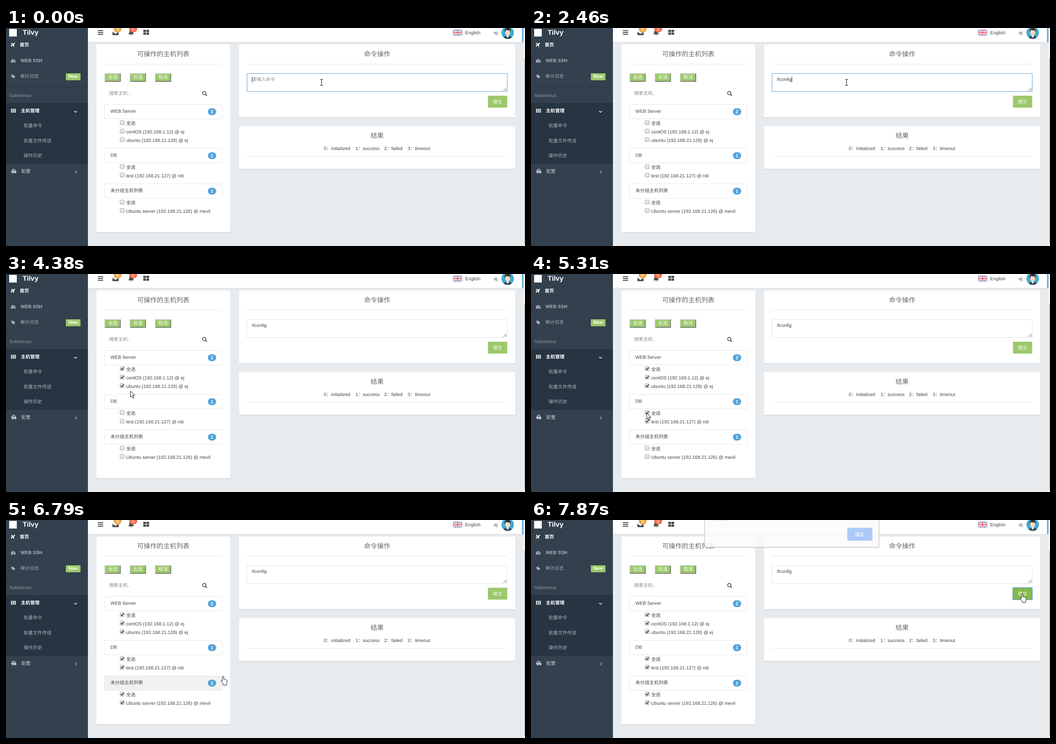
Animation of 1153 by 486 pixels, one loop 8 s. Source, as an HTML page:

```html
<!DOCTYPE html>
<html lang="zh-CN">
<head>
<meta charset="utf-8">
<title>批量命令</title>
<style>
  html, body { margin: 0; width: 100%; height: 100%; overflow: hidden; background: #e7ebee; }
  svg.stage { display: block; width: 100%; height: 100%; }
  text {
    font: 10.35px "Liberation Sans", "Noto Sans CJK SC", sans-serif;
    text-rendering: geometricPrecision;
    fill: #444;
    white-space: pre;
  }
  .title { font-size: 14.5px; font-weight: 300; text-anchor: middle; fill: #666; }
  .mid { text-anchor: middle; }
  .bold { font-weight: 700; }
  .white { fill: #fff; }
  .soft { fill: #a9b4bd; }
  .hint { fill: #8c8c8c; }
  .panel { fill: #fff; }
  .edge { fill: #d3d8db; }
  .rule { fill: #e6e6e6; }
  .row { fill: #fff; stroke: #e7e7e7; }
  .row.over { fill: #f1f1f1; }
  .box { fill: url(#boxFill); stroke: #a3a3a3; }
  .tick { fill: none; stroke: #333; stroke-width: 1.9; }
  .line { fill: none; stroke-width: 1.3; }
  #field { fill: #fff; stroke: #e2e4e6; }
  #field.focus { stroke: #5b9fd2; }
  #send { fill: #9cc96b; }
  #send.over { fill: #86ba4a; }
  #send.focus { stroke: #5a9bd0; stroke-width: 1.5; }
  .cursor { stroke-linejoin: round; }
</style>
</head>
<body>
<svg class="stage" viewBox="0 0 1153 486" xmlns="http://www.w3.org/2000/svg">
  <defs>
    <linearGradient id="boxFill" x2="0" y2="1">
      <stop stop-color="#f0f0f0"/><stop offset="1" stop-color="#dcdcdc"/>
    </linearGradient>
    <clipPath id="face"><circle cx="1114.5" cy="10.5" r="13.8"/></clipPath>
  </defs>

  <rect width="1153" height="486" fill="#e7ebee"/>

  <!-- top bar -->
  <rect x="182" y="31" width="967" height="2" fill="#d6dbde"/>
  <rect x="182" width="967" height="31.5" fill="#fff"/>
  <path d="M204 6h12M204 10h12M204 14h12" stroke="#4d4d4d" stroke-width="2"/>
  <path d="M236.5 7l6.8 5 6.8-5v9h-13.6z" fill="#4d4d4d"/>
  <path d="M236.5 7.5l6.8 5 6.8-5" stroke="#fff" class="line"/>
  <rect x="239" y="-6" width="18" height="15.5" rx="7.7" fill="#ebaa4b"/>
  <text x="248" y="6" class="mid white">9</text>
  <path d="M271.5 14q2.5-2 2.5-6a4 4 0 0 1 8 0q0 4 2.5 6zM276.3 14.8h3.4q-1.7 3-3.4 0z" fill="#4d4d4d"/>
  <rect x="273.5" y="-6" width="18" height="15.5" rx="7.7" fill="#f76c51"/>
  <text x="282.5" y="6" class="mid white">5</text>
  <path d="M305 4h6v5h-6zM312 4h6v5h-6zM305 10h6v5h-6zM312 10h6v5h-6z" fill="#4d4d4d"/>
  <g>
    <rect x="993" y="3.5" width="20.5" height="13.5" fill="#6f93cb"/>
    <path d="M993 3.5l20.5 13.5M1013.5 3.5l-20.5 13.5" stroke="#f2f2f5" stroke-width="2.6"/>
    <path d="M993 3.5l20.5 13.5M1013.5 3.5l-20.5 13.5" stroke="#e9a3a8" stroke-width=".9"/>
    <path d="M1003.2 3.5v13.5M993 10.2h20.5" stroke="#fff" stroke-width="4.4"/>
    <path d="M1003.2 3.5v13.5M993 10.2h20.5" stroke="#e5616a" stroke-width="2.2"/>
  </g>
  <text x="1020" y="13.5">English</text>
  <text x="1084" y="13.5">ej</text>
  <g clip-path="url(#face)">
    <rect x="1100" y="-4" width="29" height="29" fill="#3fabd0"/>
    <path d="M1105 25q0-6 6-7.500h7q6 1.500 6 7.500z" fill="#2f4456"/>
    <path d="M1111 17l3.500 5 3.500-5z" fill="#fff"/>
    <ellipse cx="1114.500" cy="10" rx="5.600" ry="7" fill="#f7d9bb"/>
    <path d="M1108 9.500q-1.500-9.500 6.500-9.800 8 .3 6.500 9.800l-1.600-4q-5 .2-7.800-1.500-2 2-3.600 5.500z" fill="#33292a"/>
  </g>

  <!-- page scrollbar -->
  <rect x="1149" width="4" height="486" fill="#f3f4f5"/>
  <rect x="1151" y="68" width="2" height="413" fill="#bfc2c4"/>
  <rect x="1146.5" width="3" height="31.5" fill="#58a5dc"/>

  <!-- side bar -->
  <rect width="182" height="486" fill="#33404d"/>
  <rect y="167" width="182" height="136" fill="#273441"/>
  <rect y="130.5" width="182" height="1" fill="#2a3642"/>
  <rect x="7" y="2" width="17" height="17" fill="#fff"/>
  <text x="37" y="15.3" class="bold white" style="font-size:15.5px">Tilvy</text>
  <path d="M11 33.5l2.3-.3 2.3 2.2 3-2.5 1.4.2-.1 1.4-2.5 2.7.6 4.8-1 .5-2.1-3.9-1.8 1.5v1.5l-.8.4-.8-1.7-1.7-.8.4-.7 1.5-.1 1.5-1.8z" fill="#fff"/>
  <text x="30.5" y="40.8" class="bold white">首页</text>
  <path d="M11 77a5.4 5.4 0 1 1 10 0z" fill="#a9b4bd"/>
  <path d="M16 75.5l1.5-4M12.5 74h1M18.8 74h1" stroke="#33404d" class="line"/>
  <text x="32.5" y="76" class="bold soft">WEB SSH</text>
  <path d="M11.5 104h4l5 4.8-3.6 3.7-5.4-5z" fill="#a9b4bd"/>
  <circle cx="13.3" cy="105.7" r=".9" fill="#33404d"/>
  <text x="31.7" y="111" class="soft">审计日志</text>
  <rect x="133" y="101" width="32.5" height="15.5" fill="#9cc96b"/>
  <text x="149.2" y="111" class="bold white mid">New</text>
  <text x="7" y="154.3" style="fill:#8e9aa4">Submenus</text>
  <path d="M11 181.3h11M11 184.3h11M11 187.3h11" stroke="#fff" stroke-width="2.3" stroke-dasharray="3 1"/>
  <text x="33" y="187.8" class="bold white">主机管理</text>
  <path d="M151.5 185l3 3 3-3" stroke="#fff" class="line"/>
  <text x="39" y="221.3" class="soft">批量命令</text>
  <text x="39" y="254.8" class="soft">批量文件传送</text>
  <text x="39" y="288.3" class="soft">操作历史</text>
  <path d="M11 319.5l1.3-1.5 1.4-3h1.8l.4-1.3h2.2l.4 1.3h1.8l1.4 3 1.3 1.5v3.5h-1v1.5h-1.8v-1.5h-4.4v1.5h-1.8v-1.500h-1z" fill="#b4bec6"/>
  <path d="M14 318l.8-1.8h4.4l.8 1.8z" fill="#33404d"/>
  <text x="34" y="323.3" style="fill:#c3cbd1">配置</text>
  <path d="M154 317.8l3 3-3 3" stroke="#a9b4bd" class="line"/>

  <!-- panels -->
  <g class="edge">
    <rect x="201" y="38" width="297" height="418.5"/>
    <rect x="518" y="38" width="613" height="162.5"/>
    <rect x="518" y="220" width="613" height="95.5"/>
  </g>
  <g class="panel">
    <rect x="201" y="37" width="297" height="418"/>
    <rect x="518" y="37" width="613" height="162"/>
    <rect x="518" y="219" width="613" height="95"/>
  </g>
  <g class="rule">
    <rect x="219" y="80" width="261.5" height="1"/>
    <rect x="535" y="80" width="579" height="1"/>
    <rect x="535" y="286" width="579" height="1"/>
  </g>
  <text x="349.5" y="63" class="title">可操作的主机列表</text>
  <text x="824.5" y="63" class="title">命令操作</text>
  <text x="824.5" y="245.3" class="title">结果</text>
  <text x="706" y="272.2">0：initialized</text>
  <text x="776.5" y="272.2">1：success</text>
  <text x="840" y="272.2">2：failed</text>
  <text x="892.3" y="272.2">3：timeout</text>

  <g id="tools"></g>
  <text x="229" y="148.8" class="hint">搜索主机..</text>
  <circle cx="440.5" cy="145" r="3.7" fill="none" stroke="#4d4d4d" stroke-width="1.7"/>
  <path d="M443 147.7l3.3 3.3" stroke="#4d4d4d" stroke-width="2.1"/>
  <g id="hosts"></g>

  <!-- command form -->
  <rect id="field" x="535.5" y="101.5" width="578" height="40"/>
  <path d="M1105 140l7-7M1109 140l3-3" stroke="#555" stroke-width="1"/>
  <text id="hint" x="546.3" y="117.5" class="hint">请输入命令</text>
  <text id="typed" x="546.3" y="117.5"></text>
  <rect id="caret" y="109" width="1" height="12" fill="#222"/>
  <rect id="send" x="1070.7" y="151" width="42.8" height="26.5"/>
  <text x="1092" y="167.5" class="mid white" font-weight="500">提交</text>

  <g id="dialog">
    <rect x="385" y="-4" width="389" height="66.5" rx="3" fill="#000" opacity=".1"/>
    <rect x="386" y="-5" width="387" height="65.5" rx="3" fill="#fff" fill-opacity=".84" stroke="#bfc1c3"/>
    <text x="404" y="-.5" style="fill:#888">请稍候</text>
    <rect x="702.5" y="17.5" width="56" height="28.5" rx="2.5" fill="#adc9f9"/>
    <path d="M703 32.3h55" stroke="#9dbdf0"/>
    <text x="730.5" y="36" class="mid white">确定</text>
  </g>

  <!-- pointers, each with its hot spot at 0,0 -->
  <g id="beam" class="cursor">
    <path d="M-3-6.5h2.2l.8.7.8-.7h2.2M0-6v12.5M-3 7h2.2l.8-.7.8.7h2.2" fill="none" stroke="#222" stroke-width="1.2"/>
  </g>
  <path id="arrow" class="cursor" d="M0 0v13.5l3.1-3 2.3 5.3 2.1-.9-2.3-5.2h4.3z" fill="#fff" stroke="#111"/>
  <path id="hand" class="cursor" d="M-1.6 1.5q0-1.5 1.5-1.5t1.5 1.5v5q2.3-.9 2.7.8 2-.7 2.5.8 2.1-.5 2.1 1.5v3.4q0 1.5-1.2 3.2v3.3h-7.3v-2.5l-4.5-6q-.7-1.7.7-2.1 1-.2 2 1.300z" fill="#fff" stroke="#111"/>
</svg>

<script>
const LOOP = 8000;
const $ = id => document.getElementById(id);
const show = (el, on) => { el.style.display = on ? '' : 'none'; };

// key press times and the command they type
const keys = [1050, 1200, 1510, 1630, 1910, 2040, 2180, 2460];
const command = 'ifconfig';

// time, x, y of the pointer
const path = [
  [0, 701, 121], [3020, 716, 126], [3170, 600, 152], [3310, 445, 184],
  [3450, 330, 198], [3590, 268.5, 201.5], [3740, 245, 202], [3990, 257, 208],
  [4240, 268, 232], [4380, 276.5, 261], [4500, 273, 276], [4640, 262, 290],
  [4780, 242, 298], [4920, 248, 305], [5070, 257, 310],
  [5430, 265, 322], [5560, 268, 341], [5700, 262, 357], [5860, 243, 369],
  [6060, 248, 377], [6220, 257, 382],
  [6500, 300, 381.5], [6640, 400, 366], [6790, 482.5, 348.5],
  [6920, 720, 292], [7050, 930, 232], [7190, 1138, 186], [7330, 1118, 171],
  [7480, 1098, 169], [7610, 1091.3, 164.5]
];

const groups = [
  { y: 170, name: 'WEB Server', at: 4110, hosts: ['全选', 'centOS (192.168.1.12) @ ej', 'ubuntu (192.168.21.128) @ ej'] },
  { y: 268, name: 'DB', at: 5190, hosts: ['全选', 'test (192.168.21.127) @ niti'] },
  { y: 347, name: '未分组主机列表', at: 6370, hosts: ['全选', 'Ubuntu server (192.168.21.126) @ mevil'] }
];

$('tools').innerHTML = ['全选', '反选', '取消'].map((label, i) => {
  const x = 219 + i * 56;
  return `<rect x="${x}" y="101" width="36" height="19" fill="#7d8078"/>
    <path d="M${x} 120v-19h36l-2 2h-32v15z" fill="#c4c8be"/>
    <rect x="${x + 1.5}" y="102.5" width="32.5" height="15.5" fill="#9cc96b"/>
    <text x="${x + 18}" y="113.3" class="mid white" font-weight="500">${label}</text>`;
}).join('');

$('hosts').innerHTML = groups.map(({ y, name, hosts }) => `
  <rect class="row" x="218.5" y="${y + .5}" width="262" height="32"/>
  <text x="232" y="${y + 19}">${name}</text>
  <rect x="448.5" y="${y + 9}" width="18.5" height="15.2" rx="7.6" fill="#55a3dc"/>
  <text x="457.7" y="${y + 20.3}" class="mid bold white">${hosts.length - 1}</text>
  ${hosts.map((host, i) => `
    <rect class="box" x="253.5" y="${y + 36.5 + i * 19}" width="9" height="9" rx="1"/>
    <text x="267" y="${y + 46.4 + i * 19}">${host}</text>`).join('')}
  <g class="ticks">${hosts.map((_, i) =>
    `<path class="tick" d="M255.3 ${y + 41 + i * 19}l2 2.3 4-5"/>`).join('')}</g>`).join('');

const rows = [...document.querySelectorAll('.row')];
const ticks = [...document.querySelectorAll('.ticks')];
const pointers = ['beam', 'arrow', 'hand'].map($);
const inside = (x, y, l, t, r, b) => x >= l && x <= r && y >= t && y <= b;

function draw(t) {
  const text = command.slice(0, keys.filter(k => k <= t).length);
  $('typed').textContent = text;
  show($('hint'), !text);
  $('caret').setAttribute('x', 546.3 + (text ? $('typed').getComputedTextLength() : 0));
  show($('caret'), t < 150 || (t >= 610 && t < 3020) || (t >= 3450 && t < 4110));
  $('field').classList.toggle('focus', t < 4110);

  const [, x, y] = path.findLast(p => p[0] <= t);
  const onSend = inside(x, y, 1071, 151, 1113, 177);
  let kind = onSend ? 'hand' : inside(x, y, 535, 101, 1113, 142) ? 'beam' : 'arrow';
  groups.forEach((g, i) => {
    const over = inside(x, y, 219, g.y, 483, g.y + 33);
    if (over) kind = 'hand';
    rows[i].classList.toggle('over', over);
    show(ticks[i], t >= g.at);
  });
  pointers.forEach(p => {
    show(p, p.id === kind);
    p.setAttribute('transform', `translate(${x} ${y})`);
  });

  $('send').classList.toggle('over', onSend);
  $('send').classList.toggle('focus', t >= 7740);
  show($('dialog'), t >= 7870);
}

const start = performance.now();
function tick(now) {
  draw(Math.max(0, now - start) % LOOP);
  requestAnimationFrame(tick);
}
draw(0);
requestAnimationFrame(tick);
</script>
</body>
</html>
```
